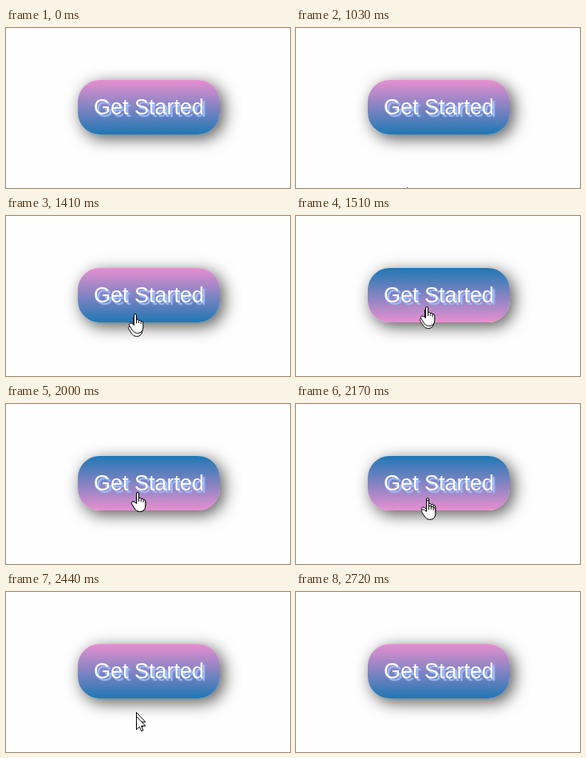
Recreate the animation shown at these times as an HTML page. Size 356 by 200 pixels, loop 4030 ms.

```html
<!DOCTYPE html>
<html lang="en">
<head>
<meta charset="utf-8">
<title>Button hover</title>
<style>
html, body { margin: 0; width: 100%; height: 100%; overflow: hidden; background: #fefefe; }
.button {
  position: absolute; left: 90px; top: 65px; width: 178px; height: 68px;
  border-radius: 27px;
  background: linear-gradient(#e78fd0, #1f78b4);
  box-shadow: 5px 5px 20px #555;
  color: #fff; font: 27px/68px "Liberation Sans", Arial, sans-serif;
  text-align: center; white-space: nowrap;
  text-shadow: 3px 3px 1px #9cc0ff;
  animation: hover 4030ms step-end infinite;
}
@keyframes hover {
  35.7%, 58.1% { background: linear-gradient(#1f78b4, #e78fd0); }
  58.1%, 100% { background: linear-gradient(#e78fd0, #1f78b4); }
}
svg { position: absolute; left: 0; top: 0; width: 356px; height: 200px; }
path { fill: #fff; stroke: #000; stroke-linejoin: round; }
</style>
</head>
<body>
<div class="button">Get Started</div>
<svg viewBox="0 0 356 200">
  <defs>
    <path id="arrow" d="M.5 .5V17L4.3 13.4L6.8 19L9 18L6.6 12.4H11.8Z"/>
    <g id="hand">
      <path d="M.5 2Q.5 .5 2 .5T3.5 2V7.5Q6 6.8 6.3 8.5Q9 7.6 9.1 9.5Q11.8 9 11.8 12V17Q11.8 24.5 4.5 24.5Q.5 24.5-1.5 21L-5 15.5Q-6.5 13-4.5 12Q-3 11.5-1.2 13L.5 14.5Z"/>
      <path d="M3.5 7.5V12M6.3 8.5V12M9.1 9.5V13" fill="none"/>
    </g>
  </defs>
  <use id="trail"/>
  <use id="cursor"/>
</svg>
<script>
const LOOP = 4030, STEP = 34;
const ENTER = 1030, SETTLE = 590, LEAVE = 2000, GONE = 2720;
const BUTTON_BOTTOM = 133;
const trail = document.getElementById("trail");
const cursor = document.getElementById("cursor");

// Glide in with a quadratic ease-out, rest, then drop away faster and faster.
function position(t) {
  const left = 1 - Math.min(1, (t - ENTER) / SETTLE);
  const fall = Math.max(0, (t - LEAVE) / 306);
  return [163 - 24 * left ** 2, 110 + 88.5 * left ** 2 + 25 * fall ** 1.6].map(Math.round);
}

function place(el, t) {
  const visible = t >= ENTER && t < GONE;
  el.style.display = visible ? "" : "none";
  if (!visible) return;
  const [x, y] = position(t);
  el.setAttribute("href", y < BUTTON_BOTTOM ? "#hand" : "#arrow");
  el.setAttribute("transform", `translate(${x} ${y})`);
}

function draw() {
  const t = performance.now() % LOOP;
  const start = t < LEAVE ? ENTER : LEAVE;
  const tick = start + STEP * Math.floor((t - start + 8) / STEP);
  place(trail, tick - STEP);
  place(cursor, t < GONE ? tick : GONE);
  requestAnimationFrame(draw);
}
draw();
</script>
</body>
</html>
```
